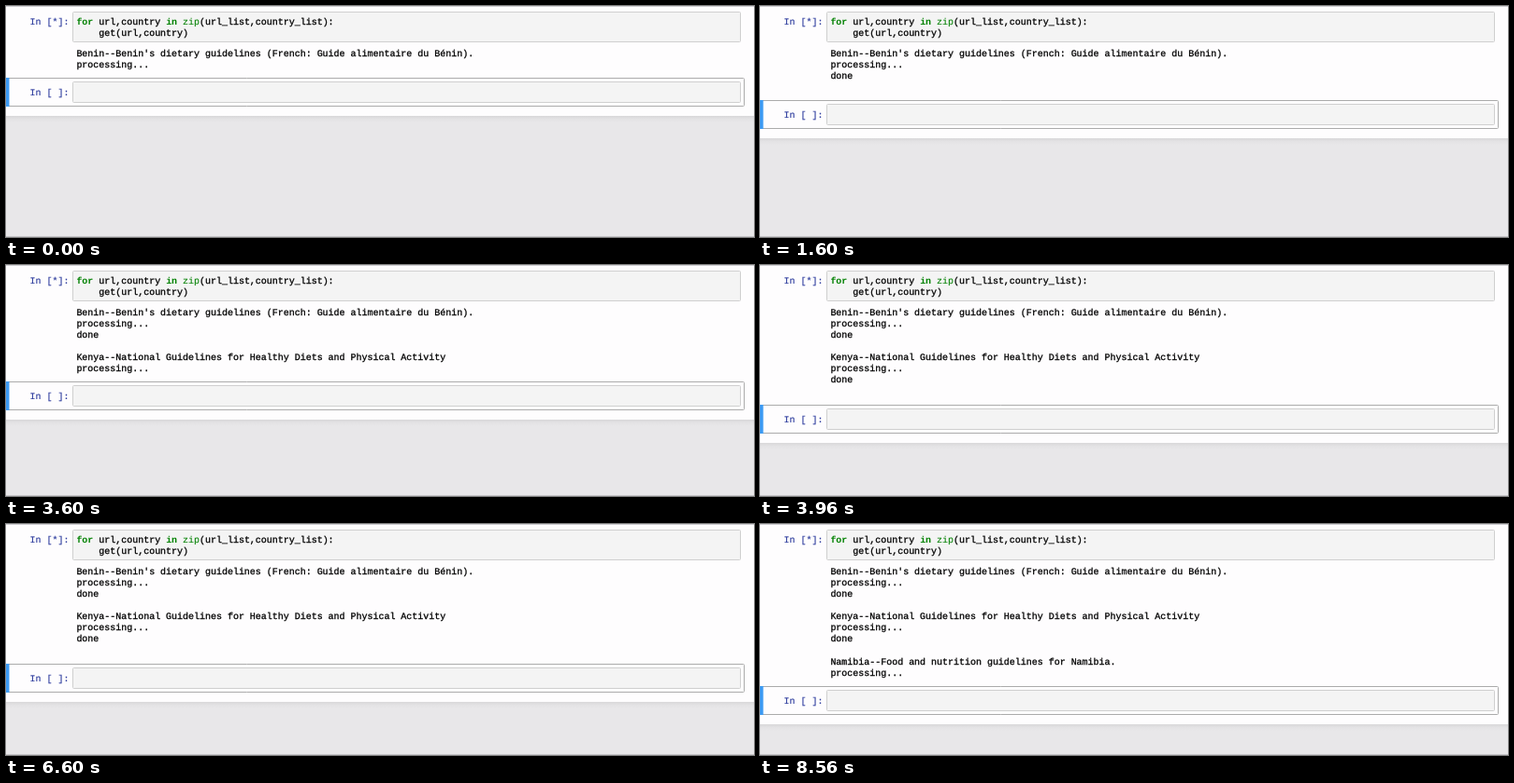
An HTML page that plays this animation: 800 px wide and 248 px high, repeating every 8600 ms.

```html
<!DOCTYPE html>
<html lang="en">
<head>
<meta charset="utf-8">
<title>Notebook run</title>
<style>
  html, body { margin: 0; width: 100%; height: 100%; overflow: hidden; background: #e8e7e9; }
  svg { display: block; }
  text {
    font: 9.97px "Liberation Mono", "Courier New", monospace;
    white-space: pre;
    text-rendering: geometricPrecision;
    fill: #000;
    stroke: #000;
    stroke-width: .3px;
  }
  .prompt { fill: #303f9f; stroke: #303f9f; stroke-width: .18px; }
  .key { fill: #008000; stroke: none; font-weight: bold; }
  .builtin { fill: #008000; stroke: #008000; stroke-width: .1px; }
  .input { fill: #f4f4f4; stroke: #cfcfcf; }
</style>
</head>
<body>
<svg width="800" height="248" viewBox="0 0 800 248">
  <defs>
    <linearGradient id="shade" x1="0" y1="0" x2="0" y2="1">
      <stop offset="0" stop-color="#575757" stop-opacity=".11"/>
      <stop offset=".5" stop-color="#575757" stop-opacity=".03"/>
      <stop offset="1" stop-color="#575757" stop-opacity="0"/>
    </linearGradient>
  </defs>
  <rect width="800" height="248" fill="#e8e7e9"/>
  <rect id="page" width="800" height="118" fill="#fefdfe"/>
  <rect width="800" height="1" fill="#cfced3"/>
  <rect y="247" width="800" height="1" fill="#c6c5c8"/>

  <rect class="input" x="71.5" y="6.5" width="714" height="32" rx="1"/>
  <text class="prompt" x="25.6" y="20">In [*]:</text>
  <text x="75.4" y="20"><tspan class="key">for</tspan> url,country <tspan class="key">in</tspan> <tspan class="builtin">zip</tspan>(url_list,country_list):</text>
  <text x="75.4" y="32.2">    get(url,country)</text>

  <g id="output"></g>

  <g id="next">
    <rect x="0" y="118" width="800" height="7" fill="url(#shade)"/>
    <rect x=".5" y="77.5" width="789" height="30" rx="1" fill="#fefdfe" stroke="#ababab"/>
    <rect x="0" y="77" width="3.5" height="31" fill="#3d9bf3"/>
    <rect class="input" x="71.5" y="81.5" width="714" height="22" rx="1"/>
    <text class="prompt" x="25.6" y="95.5">In [ ]:</text>
  </g>
</svg>
<script>
  const LOOP = 8600;
  const LINE = 12.12;
  const lines = [
    "Benin--Benin's dietary guidelines (French: Guide alimentaire du Bénin).",
    "processing...",
    "done",
    "",
    "Kenya--National Guidelines for Healthy Diets and Physical Activity",
    "processing...",
    "done",
    "",
    "Namibia--Food and nutrition guidelines for Namibia.",
    "processing..."
  ];
  // Each step prints two more lines and pushes the next cell down.
  const steps = [0, 800, 2120, 3960, 6640];

  const byId = id => document.getElementById(id);
  const page = byId("page");
  const next = byId("next");

  const rows = lines.map((line, i) => {
    const row = document.createElementNS("http://www.w3.org/2000/svg", "text");
    row.setAttribute("x", 75.4);
    row.setAttribute("y", (53.7 + i * LINE).toFixed(2));
    row.textContent = line;
    byId("output").append(row);
    return row;
  });

  function draw(time) {
    const t = time % LOOP;
    const step = steps.filter(start => t >= start).length - 1;
    const shift = Math.round(step * 2 * LINE);
    rows.forEach((row, i) => {
      row.setAttribute("visibility", i < 2 + step * 2 ? "visible" : "hidden");
    });
    page.setAttribute("height", 118 + shift);
    next.setAttribute("transform", `translate(0 ${shift})`);
  }

  let start;
  function tick(now) {
    start ??= now;
    draw(Math.max(0, now - start));
    requestAnimationFrame(tick);
  }
  draw(0);
  requestAnimationFrame(tick);
</script>
</body>
</html>
```
